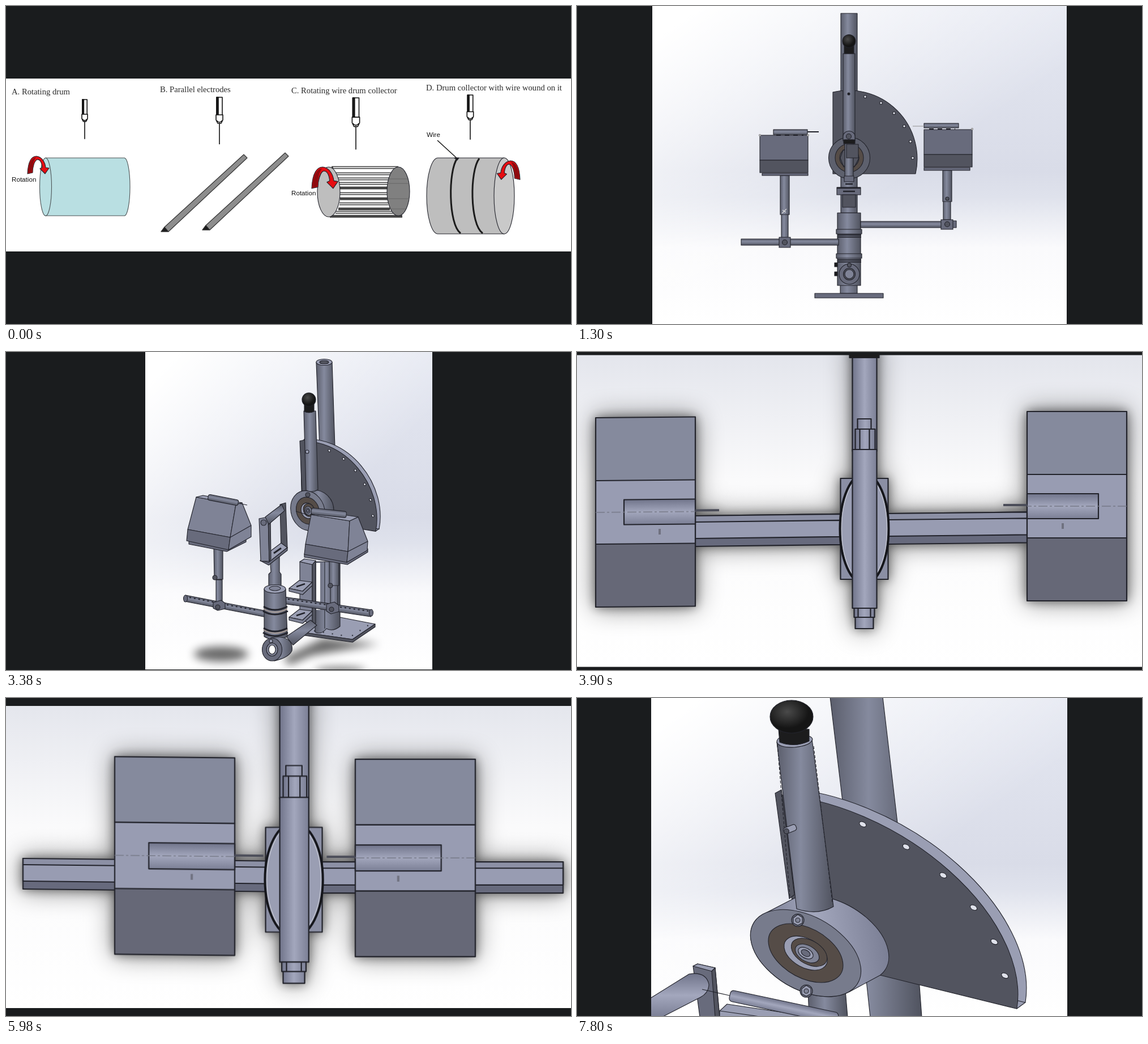
These frames come from a looping animation (998 px wide and 561 px high, 8000 ms). An HTML page:

```html
<!DOCTYPE html>
<html lang="en">
<head>
<meta charset="utf-8">
<title>Collector rig slideshow</title>
<style>
html,body{margin:0;width:100%;height:100%;overflow:hidden;background:#1a1c1e}
svg{display:block;width:998px;height:561px;fill:#7f8396;stroke:#22232b;stroke-width:1.1;stroke-linejoin:round}
svg *{vector-effect:non-scaling-stroke}
.slide{visibility:hidden;animation:show 8s step-end infinite;animation-delay:calc(var(--i)*1.3s - 8s)}
.last{animation-name:tail}
@keyframes show{0%{visibility:visible}16.25%,to{visibility:hidden}}
@keyframes tail{0%{visibility:visible}2.5%,to{visibility:hidden}}
.bar{fill:#1a1c1e;stroke:none}
.l{fill:#9a9eb3}.m{fill:#686b7c}.d{fill:#52545f}.k{fill:#1c1c1d}.w{fill:#fff}
.brown{fill:#554c47}.tan{fill:#a0958f}.red{fill:#e60d12}.grey{fill:#bebebe}
.n{fill:none}.x{stroke:none}
.t{fill:url(#t)}.v{fill:url(#v)}.tl{fill:url(#tl)}.vl{fill:url(#vl)}
.dots{fill:none;stroke:#3a3c47;stroke-linecap:round}
.top{stroke-width:2.2;filter:drop-shadow(0 0 9px #0007) drop-shadow(0 0 22px #0007)}
.shade{fill:#000;stroke:none;opacity:.6;filter:blur(8px)}
text{fill:#2b2b2b;stroke:none;font:14.65px "Liberation Serif",serif}
.lab{font:11.65px "Liberation Sans",sans-serif;fill:#111}
</style>
</head>
<body>
<svg viewBox="0 0 998 561">
<defs>
  <linearGradient id="t"><stop stop-color="#5b5e6c"/><stop offset=".42" stop-color="#858a9e"/><stop offset="1" stop-color="#50535f"/></linearGradient>
  <linearGradient id="v" href="#t" x2="0" y2="1"/>
  <linearGradient id="tl"><stop stop-color="#70748a"/><stop offset=".5" stop-color="#a3a7bd"/><stop offset="1" stop-color="#7b7f95"/></linearGradient>
  <linearGradient id="vl" href="#tl" x2="0" y2="1"/>
  <linearGradient id="sky" x2="0" y2="1"><stop stop-color="#e4e7f1"/><stop offset=".52" stop-color="#d9dce8"/><stop offset=".6" stop-color="#dfe2ec"/><stop offset=".76" stop-color="#fafafc"/><stop offset="1" stop-color="#fff"/></linearGradient>
  <linearGradient id="glow" x2=".55" y2=".6"><stop offset=".1" stop-color="#fff"/><stop offset="1" stop-color="#fff" stop-opacity="0"/></linearGradient>
  <linearGradient id="floor" x2="0" y2="1"><stop stop-color="#e3e5ec"/><stop offset=".4" stop-color="#fafafb"/><stop offset="1" stop-color="#fff"/></linearGradient>
  <radialGradient id="ball" cx=".4" cy=".35"><stop stop-color="#4a4a4a"/><stop offset="1" stop-color="#151515"/></radialGradient>

  <g id="bg" class="x"><rect width="100" height="561" fill="url(#sky)"/><rect width="100" height="561" fill="url(#glow)"/></g>

  <g id="needle" stroke="#111" stroke-width="1.6">
    <rect class="w" x="-5" width="10" height="32"/><rect class="k" x="-5" width="3" height="32"/>
    <path class="w" d="M-6 31H6V40L3 46H-3L-6 40Z"/><path class="n" d="M-5 41Q0 47 5 41M0 46V83"/>
  </g>
  <g id="arrow">
    <path class="red" d="M0 31C1 8 8 0 16 0C25 1 31 10 32 20L38 21L31 31L22 22L26 20C25 11 22 5 17 6C12 8 9 19 9 29Z"/>
    <path class="x" fill="#8e0b0f" d="M1 30C2 10 8 3 15 2C10 8 9 19 8 28Z"/>
  </g>

  <!-- index plate and hub, centred on the pivot -->
  <path id="plate" d="M-28-118A121 121 0 0 1 118 26H-28Z"/>
  <circle id="hole" r="2.3" fill="#dfe1ea"/>
  <g id="quad">
    <use href="#plate" class="d"/>
    <use href="#hole" x="29" y="-110"/><use href="#hole" x="57" y="-99"/><use href="#hole" x="80" y="-81"/>
    <use href="#hole" x="98" y="-58"/><use href="#hole" x="109" y="-31"/><use href="#hole" x="113" y="-2"/>
  </g>
  <g id="face">
    <circle r="37" fill="#777b8c"/><circle class="brown" r="25"/><circle class="l" r="14.500"/>
    <circle class="brown" cx="2.500" cy="-1.500" r="12"/><circle r="8" cx="1"/><circle class="l" r="5"/><circle class="m" r="3"/>
  </g>

  <g id="box">
    <rect width="176" height="111" fill="#858a9d"/><rect y="111" width="176" height="112" fill="#989cb2"/>
    <rect y="223" width="176" height="111" fill="#666877"/>
    <rect class="vl" x="50" y="145" width="126" height="44"/>
    <path class="n" d="M176 165H218" stroke="#4b4d59" stroke-width="4"/>
    <path class="n" d="M0 167H176" stroke="#777a88" stroke-width="1.5" stroke-dasharray="16 4 4 4"/>
    <path class="n" d="M113 197V207" stroke="#707280" stroke-width="4"/>
  </g>
  <g id="arm">
    <rect width="100" height="54" fill="#676a7d"/><rect width="100" height="12" fill="#8c90a5"/><rect y="11" width="100" height="29" fill="#989cb2"/>
  </g>
  <g id="hub">
    <rect class="tl" x="-21" y="-5" width="43" height="180"/><path class="k" d="M-26 0H26V10H-26Z"/>
    <rect x="-42" y="223" width="84" height="178" fill="#8b8fa4"/>
    <ellipse class="l" cy="312" rx="43" ry="97" stroke="#15161b" stroke-width="4"/>
    <ellipse class="n" cy="312" rx="40" ry="93" stroke="#c3c5d0" stroke-width="1.2"/>
    <rect class="tl" x="-21" y="172" width="43" height="280"/>
    <path class="tl" d="M-12 118H12V136H19V172H-16V136H-12Z"/><path class="n" d="M-12 136H12M-8 136V172M9 136V172"/>
    <path class="tl" d="M-18 452H18V468H16V488H-16V468H-18Z"/><path class="n" d="M-17 468H17M-11 452V468M11 452V468"/>
  </g>

  <g id="shelf">
    <path class="l" d="M317 127L502 235L448 264L265 157Z"/>
    <path d="M265 157L448 264L440 290L253 185Z"/>
    <path class="d" d="M502 235L448 264L440 290L496 262Z"/>
    <path class="dots" stroke-width="6" stroke-dasharray="0 23.8" d="M319 135L465 218M277 160L423 243"/>
    <ellipse id="slot" cx="339" cy="170" rx="8.5" ry="4.5" fill="#777a8c" stroke-width="1.4"/>
    <use href="#slot" x="21" y="12"/><use href="#slot" x="42" y="24"/><use href="#slot" x="63" y="36"/>
  </g>
  <g id="bolt"><circle class="m" r="11"/><path class="l" d="M-8-4L0-10L8-5V5L0 9L-8 5Z"/><circle r="4"/></g>
</defs>

<g class="slide" style="--i:0">
  <path class="bar" d="M0 0H998V561H0Z"/><rect class="w x" y="128" width="998" height="305"/>
  <text x="10" y="156">A. Rotating drum</text><text x="272" y="152">B. Parallel electrodes</text>
  <text x="504" y="154">C. Rotating wire drum collector</text><text x="742" y="149">D. Drum collector with wire wound on it</text>
  <use href="#needle" transform="translate(139 165)scale(.84)"/><use href="#needle" transform="translate(377 161)"/>
  <use href="#needle" transform="translate(618 162)scale(1.1)"/><use href="#needle" transform="translate(820 157)scale(.95)"/>

  <g fill="#b9dfe2" stroke="#4c5355">
    <path d="M70 268H209A10 51 0 0 1 209 370H70Z"/><ellipse cx="70" cy="319" rx="10.5" ry="51"/>
  </g>
  <use href="#arrow" x="38" y="265"/><text class="lab" x="10" y="310">Rotation</text>

  <g fill="#8d8d8d" stroke="#333">
    <path id="rod" d="M420 262L426 268L287 398L274 398L280 390Z"/><path id="tip" class="k" d="M274 398L280 390L287 398Z"/>
    <use href="#rod" x="73" y="-3"/><use href="#tip" x="73" y="-3"/>
  </g>

  <path id="wires" class="n" stroke="#444" stroke-width="4.4" d="M575 285H693M582 296H681M586 305H677M588 313H675M589 321H674M590 331H673M590 340H674M589 349H675M587 358H678M582 364H684M572 371H700"/>
  <use href="#wires" style="stroke:#bbb;stroke-width:2"/>
  <path class="n" stroke="#ddd" stroke-width="2" d="M578 285H693M582 296H681M586 305H677M588 313H675M590 331H673M589 349H675M582 364H684"/>
  <ellipse cx="693" cy="327" rx="20" ry="43" fill="#808080"/>
  <path class="n" stroke="#666" d="M677 305H709M675 313H711M674 340H712M678 358H706"/>
  <ellipse class="grey" cx="570" cy="328" rx="20" ry="44"/>
  <use href="#arrow" transform="translate(540 284)scale(1.22)"/><text class="lab" x="504" y="334">Rotation</text>

  <path class="grey" d="M880 268H763A20 67 0 0 0 763 402H880Z"/>
  <ellipse cx="880" cy="335" rx="18" ry="67" fill="#c9c9c9"/>
  <path class="n" stroke="#1b1b1b" stroke-width="3" d="M797 269C781 290 781 385 803 401M836 269C819 290 819 385 842 401"/>
  <path class="n" stroke="#111" stroke-width="1.4" d="M762 237L798 270"/><path class="k" d="M792 268H800L797 272Z"/>
  <use href="#arrow" transform="translate(908 273)scale(-1.07 1.07)"/><text class="lab" x="743" y="231">Wire</text>
</g>

<g class="slide" style="--i:1">
  <path class="bar" d="M0 0H998V561H0Z"/><use href="#bg" transform="translate(133)scale(7.32 1)"/>
  <rect class="t" x="466" y="13" width="29" height="352"/>
  <use href="#quad" x="480" y="270"/>
  <circle cx="481" cy="268" r="36.5" fill="#5d606d"/><circle class="brown" cx="481" cy="268" r="25"/><circle class="d" cx="481" cy="268" r="17"/>
  <path class="n" d="M470 254L492 254L498 268L490 284H471L465 268Z"/>
  <rect class="t" x="470" y="84" width="21" height="152"/><circle class="k" cx="480" cy="155" r="2"/>
  <rect class="k" x="472" y="68" width="17" height="16"/><circle cx="480.5" cy="62" r="11.5" fill="url(#ball)"/>
  <path class="m" d="M470 238V230A10 9 0 0 1 491 230V238Z"/><circle class="d" cx="480" cy="230" r="4.5"/>
  <rect class="t" x="473" y="236" width="15" height="70"/><rect class="d" x="476" y="244" width="21" height="24"/><path class="k" d="M471 236H491V243H471Z"/>
  <path class="m" d="M472 300H489V310H472Z"/><path class="m" d="M459 320H501V333H459Z"/><path class="d" d="M469 333H492V355H469Z"/>
  <path class="n" stroke-width="2.4" d="M459 321H501M470 327H491M474 314H487"/>
  <path class="t" d="M460 365H501V493H460ZM465 493H495V507H465Z"/>
  <path id="ring" class="t" d="M458 394H503V402H458Z"/><path id="seal" class="n" stroke-width="2" d="M460 404H502M460 407.500H502"/>
  <use href="#ring" y="43"/><use href="#seal" y="44"/>
  <circle class="m" cx="481" cy="473" r="18"/><circle class="d" cx="481" cy="473" r="10.500"/><circle cx="481" cy="473" r="8"/><circle class="d" cx="481" cy="457" r="3.500"/>
  <path class="k" d="M455 453H460V460H455ZM455 469H460V476H455Z"/><path class="m" d="M420 507H541V515H420Z"/>
  <path class="v" d="M501 380H646V391H501Z"/><path class="t" d="M646 290H662V345H646ZM647 345H660V377H647Z"/>
  <path class="m" d="M664 379H670V391H664ZM643 377H664V394H643Z"/><circle class="d" cx="654" cy="385" r="4.500"/><circle class="d" cx="654" cy="340" r="3"/>
  <path class="v" d="M290 411H462V422H290Z"/><path class="t" d="M359 299H375V368H359ZM361 368H373V410H361Z"/>
  <path class="m" d="M357 408H377V426H357Z"/><circle class="d" cx="367" cy="417" r="4.500"/>
  <path class="n" stroke="#ddd" d="M362 366L370 358M363 360L369 364"/>
  <g id="can"><path class="m" d="M323 228H408V272H323Z"/><path class="d" d="M323 272H408V294H323Z"/></g>
  <path class="m" d="M327 295H408V299H327Z"/><path class="v" d="M347 218H407V227H347Z"/>
  <path class="n" stroke-width="2" d="M407 222H427"/><path class="n" stroke-width="2" stroke-dasharray="8 7" d="M352 228H400"/>
  <use href="#can" x="290" y="-10"/><path class="m" d="M613 285H694V290H613Z"/><path class="v" d="M613 207H674V215H613Z"/>
  <path class="n" stroke="#999" d="M593 212H613"/><path class="n" stroke-width="2" stroke-dasharray="8 7" d="M622 217H668"/>
  <g fill="#ccc" stroke="#888"><circle cx="323" cy="228" r="1.500"/><circle cx="408" cy="228" r="1.500"/><circle cx="698" cy="217" r="1.500"/></g>
</g>

<g class="slide" style="--i:2">
  <path class="bar" d="M0 0H998V561H0Z"/><use href="#bg" transform="translate(246)scale(5.07 1)"/>
  <ellipse class="shade" cx="380" cy="533" rx="48" ry="13"/><path class="shade" d="M490 540L560 505L660 515L540 535L500 552Z"/><ellipse class="shade" cx="590" cy="562" rx="45" ry="6"/>
  <path class="t" d="M548 18L576 18L581 168H554Z"/><ellipse class="l" cx="562" cy="18" rx="14" ry="5.500"/><ellipse class="d" cx="562" cy="18" rx="8" ry="3"/>
  <path class="l" d="M653 316L659 312L645 300Z"/>
  <use href="#plate" class="l" transform="matrix(.89 .145 .02 .952 553.500 270.500)"/>
  <use href="#quad" transform="matrix(.89 .145 .02 .952 547.500 274.500)"/>
  <path class="d" d="M519 157L528 155L532 248H523Z"/>
  <path class="l" d="M520 494L590 468L652 480L612 507Z"/><path class="d" d="M520 494L612 507L652 480V485L612 512L520 499Z"/><path class="dots" stroke-width="2.500" stroke-dasharray="0 16" d="M612 500L640 482M545 492L600 501"/>
  <path class="t" d="M546 370H590V484Q578 494 566 488Q556 500 546 494Z"/><path class="n" d="M563 370V488"/><path class="w" d="M548 372H555V455H548Z" stroke="none"/>
  <path class="t" d="M533 245C560 238 580 258 579 282C575 305 555 314 533 315Z"/>
  <use href="#face" transform="matrix(.82 .1 .02 .95 533 280)"/>
  <path class="t" d="M526 104H547L551 243Q541 249 530 244Z"/><circle class="l" cx="532" cy="176" r="3"/><circle class="d" cx="533" cy="252" r="4"/>
  <path class="k" d="M527 92H544V105Q535 109 527 105Z"/><circle cx="535" cy="84" r="12" fill="url(#ball)"/>
  <path class="t" d="M571 368H588V412H571ZM573 412H586V450H573Z"/><circle class="d" cx="573" cy="412" r="4"/>
  <path d="M519 370L541 375V482L519 470Z"/><path class="d" d="M541 375L547 368V478L541 482Z"/><path class="l" d="M519 370L527 365L547 368L541 375Z"/>
  <g id="step"><path class="l" d="M500 417L518 403L541 406L524 422Z"/><path d="M500 417L524 422L541 406V412L524 428L500 422Z"/><path class="n" stroke-width="2.500" d="M513 414L528 409"/></g><use href="#step" y="51"/>
  <rect class="v" width="156" height="12" transform="translate(492 432)rotate(8.500)"/><ellipse class="m" cx="645" cy="460" rx="3.500" ry="6"/>
  <path class="n" stroke-width="2" stroke-dasharray="3 5" d="M498 436L566 446M590 450L640 457"/>
  <path class="m" d="M566 445L580 441L588 447V458L574 462L566 457Z"/><circle class="d" cx="575" cy="454" r="4"/>
  <path class="m" d="M527 356L603 370L639 347V353L603 375L527 362Z"/>
  <path d="M539 287L607 298L604 352L529 339Z"/><path class="m" d="M529 339L604 352L602 371L527 357Z"/><path d="M607 298L622 291L639 334L638 350L602 371L604 352Z"/>
  <path class="l" d="M539 287L556 281L622 291L607 298Z"/><rect class="v" width="62" height="11" rx="3" transform="translate(540 275)rotate(6)"/>
  <path class="n" d="M604 352L639 334M535 288L512 281"/>

  <rect class="v" width="152" height="11" transform="translate(317 429)rotate(11)"/><ellipse class="m" cx="317" cy="435" rx="3.500" ry="6"/>
  <path class="n" stroke-width="2" stroke-dasharray="3 5" d="M324 433L366 441M390 446L445 456"/>
  <path class="t" d="M367 345H383V401H368ZM371 402H382V444H371Z"/><circle class="d" cx="369" cy="398" r="4"/>
  <path class="m" d="M366 442L380 438L387 443V453L374 456L366 452Z"/><circle class="d" cx="374" cy="450" r="4"/>
  <path class="m" d="M323 333L390 348L424 329V335L390 352L323 339Z"/>
  <path d="M336 256L406 269L396 327L321 313Z"/><path class="m" d="M321 313L396 327L393 349L319 333Z"/><path d="M406 269L417 266L433 306V326L393 349L396 327Z"/>
  <path class="l" d="M336 256L348 253L417 266L406 269Z"/><rect class="v" width="54" height="10" rx="3" transform="translate(358 251)rotate(11)"/>
  <path class="n" d="M396 327L433 306M411 267L426 270"/>

  <path class="v" d="M495 502L538 473L549 482L507 517Z"/>
  <path class="t" d="M466 360H483V388L486 392V420H464V392L468 388Z"/>
  <path class="d" d="M484 269L494 266L497 346L486 349Z"/><path class="l" d="M449 368L466 352L486 337L497 345L464 371Z"/><path class="m" d="M449 368L464 371L497 345V350L464 376Z"/>
  <path class="n" stroke-width="3" d="M473 355L486 346"/>
  <path d="M447 294L463 291L465 369L450 369Z"/><path class="d" d="M463 291L467 290L468 365L465 369Z"/><path class="v" d="M458 291L487 269L492 280L464 304Z"/><circle class="m" cx="455" cy="301" r="5"/>
  <path class="t" d="M456 418V502Q475 514 497 502L494 418Z"/><ellipse class="l" cx="475" cy="418" rx="19" ry="7.500"/><ellipse cx="475" cy="417" rx="10" ry="4"/>
  <g class="n" stroke-width="3"><path id="band" d="M455 449Q474 461 497 449M454 457Q474 469 498 457"/><use href="#band" y="38"/></g>
  <path class="n" stroke="#a69a94" stroke-width="2" d="M455 453Q474 465 497 453M455 490Q474 502 498 490"/>
  <path class="t" d="M468 504C490 500 508 506 505 527C500 538 485 542 474 545Z"/><ellipse class="m" cx="470" cy="525" rx="17.500" ry="20"/><ellipse cx="470" cy="525" rx="10" ry="11.500"/><ellipse class="w" cx="470" cy="525" rx="6" ry="8"/><circle class="l" cx="468" cy="510" r="3"/>
  <path class="bar" d="M246 560H753V561H246Z"/>
</g>

<g class="slide" style="--i:3">
  <rect class="x" width="998" height="561" fill="url(#floor)"/>
  <g class="top">
    <use href="#arm" transform="translate(209 289)skewY(-.7)scale(2.56 1)"/><use href="#arm" transform="translate(549 285)skewY(-.6)scale(2.46 1)"/>
    <use href="#hub" x="507.500"/>
    <use href="#box" transform="translate(33 116)skewY(-.5)"/><use href="#box" transform="translate(971 105)scale(-1 1)"/>
  </g>
  <path class="bar" d="M0 0H998V5.500H0ZM0 555.500H998V561H0Z"/><path class="k x" d="M481 4H533V10H481Z"/>
</g>

<g class="slide" style="--i:4">
  <rect class="x" width="998" height="561" fill="url(#floor)"/>
  <g class="top">
    <use href="#arm" transform="translate(30 283)skewY(.6)scale(4.300 1)"/><use href="#arm" transform="translate(555 289)scale(4.290 1.020)"/>
    <use href="#hub" transform="translate(508.500 -3.300)scale(1.190 1.038)"/>
    <use href="#box" transform="translate(192 103.500)skewY(.6)scale(1.2045 1.043)"/><use href="#box" transform="translate(829 108)scale(-1.2045 1.043)"/>
  </g>
  <path class="bar" d="M0 0H998V14H0ZM0 547H998V561H0Z"/>
</g>

<g class="slide" style="--i:5">
  <use href="#bg" transform="translate(57)scale(8.830 1)"/>
  <rect class="t" x="108" y="-5" width="104" height="325" transform="skewX(-21.500)"/>
  <path class="l" d="M57 332L80 315L112 325L104 348L57 352Z"/><path d="M57 330L104 348L98 375L57 358Z"/>
  <ellipse class="tan" cx="106" cy="313" rx="15" ry="13"/><path class="tan" d="M93 308L104 302L118 310V320L106 325L93 317Z"/><path class="l" d="M107 296L118 294L126 301L118 308Z"/>
  <path class="d" d="M163 411L195 430L180 470L143 490Z"/>
  <rect class="vl" x="-150" width="430" height="96" transform="translate(170 453)rotate(29)"/>
  <path class="d" d="M320 10L345-5H364L317 127L265 157ZM253 185L287 203L228 355L174 384ZM163 411L195 430L190 444Q155 450 136 490Z"/>
  <path d="M240-2H302L320 10L253 185L163 411L126 511L60 474L73 433Z"/><path class="l" d="M302-2L320 10L338-2Z"/><path class="n" d="M73 433L143 470"/>
  <path class="l" d="M57 360L90 378L57 382Z"/><path class="m" d="M57 382L90 378L70 435L57 442Z"/>
  <use href="#shelf"/><use href="#shelf" x="-91" y="227"/>

  <rect class="v" x="880" y="300" width="90" height="62" transform="rotate(-33 880 300)"/><path class="l" d="M915 285Q920 262 942 261V272Z"/>
  <g class="t" transform="skewX(-21)">
    <path d="M750 420H817V563H750Z"/><path d="M742 150H822V447Q775 450 742 417Z"/><path d="M819 484V563H1060V540Z"/>
  </g>
  <path d="M638 452C630 495 710 540 795 556C830 560 850 548 850 530L848 515L650 445Z" fill="#a9897a" stroke-width="2.500"/>
  <path fill="#53351f" stroke="#15110e" stroke-width="4" d="M650 446C648 485 720 525 800 540C830 545 845 535 847 518Z"/>
  <path class="tan" stroke-width="2" d="M660 415C645 455 720 500 800 518C835 526 858 525 862 516L875 465L870 450Z"/>
  <path class="t" transform="skewX(-21)" d="M829 285V428C860 465 957 486 997 487C1028 490 1048 485 1051 477L1047 350Z"/>
  <ellipse class="l" cx="816" cy="311" rx="102" ry="47" transform="rotate(20 816 311)"/>
  <path class="t" transform="skewX(-21)" d="M880 245V298C900 325 950 342 993 335V188L948 178Z"/><path class="l" d="M880 190Q905 205 918 190L916 178Z"/>
  <path class="tan" d="M655 415L676 420L668 440L655 432Z"/><ellipse class="tan" cx="684" cy="432" rx="13" ry="18" transform="rotate(15 684 432)"/><path fill="#c3bbb5" d="M675 424L686 418L696 428L692 444L680 446Z"/>
  <path class="l" d="M608 563L680 530Q700 530 707 545V563Z"/><path class="m" d="M640 563L690 538L707 552V563Z"/>
  <path class="m" d="M513 100L768 244L942 142V158L768 258L513 109Z"/><path class="n" d="M513 103L768 251L942 150"/>
  <path d="M471-2H788L803 147L768 244L442 58Z"/><path fill="#686b78" d="M788-2H942V72L803 147Z"/><path class="d" d="M803 147L942 72V142L768 244Z"/>
  <path class="bar" d="M0 0H57V561H0ZM940 0H998V561H940Z"/>
</g>

<g class="slide last" style="--i:6">
  <use href="#bg" transform="translate(131)scale(7.350 1)"/>
  <path class="t" d="M447-2H540L566 220L470 190ZM508 470L604 495L609 563H518Z"/>
  <path class="t" d="M408 515H474L478 563H410Z"/>
  <path class="l" d="M777 548L792 537L760 520Z"/>
  <use href="#plate" class="l" transform="matrix(2.623 .644 .284 1.972 475 410)"/>
  <use href="#quad" transform="matrix(2.623 .644 .284 1.972 460 421)"/>
  <path class="d" d="M350 168L361 162L384 347L375 354Z"/>
  <g transform="matrix(2.623 .644 .284 1.972 460 421)">
    <path class="tl" d="M26 26A37 37 0 0 0-26-26L-50-3.500A37 37 0 0 0 2.500 48.700Z"/><use href="#face" x="-23.800" y="22.500"/>
  </g>
  <path class="t" d="M353 78L415 72L453 368Q425 384 388 372Z"/><path class="l" d="M353 78Q352 66 384 66Q415 64 416 73Q413 84 384 87Q357 88 353 78Z"/>
  <path class="n" stroke-dasharray="5 3" d="M354 82L376 350M418 85L451 360"/>
  <path class="k" d="M356 55H410V76Q385 88 358 78Z"/><ellipse cx="379" cy="33" rx="38" ry="29" fill="url(#ball)"/>
  <rect class="l" x="365" y="226" width="23" height="11" rx="4" transform="rotate(-22 376 232)"/><circle class="d" cx="370" cy="235" r="4.500"/>
  <use href="#bolt" transform="translate(390 392)"/><use href="#bolt" transform="translate(405 517)"/>
  <path class="m" d="M205 473L213 469L244 476L252 563H217Z"/><path class="l" d="M205 473L213 469L244 476L238 482Z"/><path class="d" d="M238 482L244 476L252 563H244Z"/>
  <path class="vl" d="M129 530L198 487Q228 482 233 505Q233 520 218 528L150 563H129Z"/>
  <path class="l" d="M252 552L265 540L420 563H252Z"/><rect class="vl" width="195" height="20" rx="6" transform="translate(272 515)rotate(12)"/>
  <path class="n" d="M221 514L270 525M252 552L330 563"/>
  <path class="bar" d="M0 0H131V561H0ZM866 0H998V561H866Z"/>
</g>
</svg>
</body>
</html>
```
